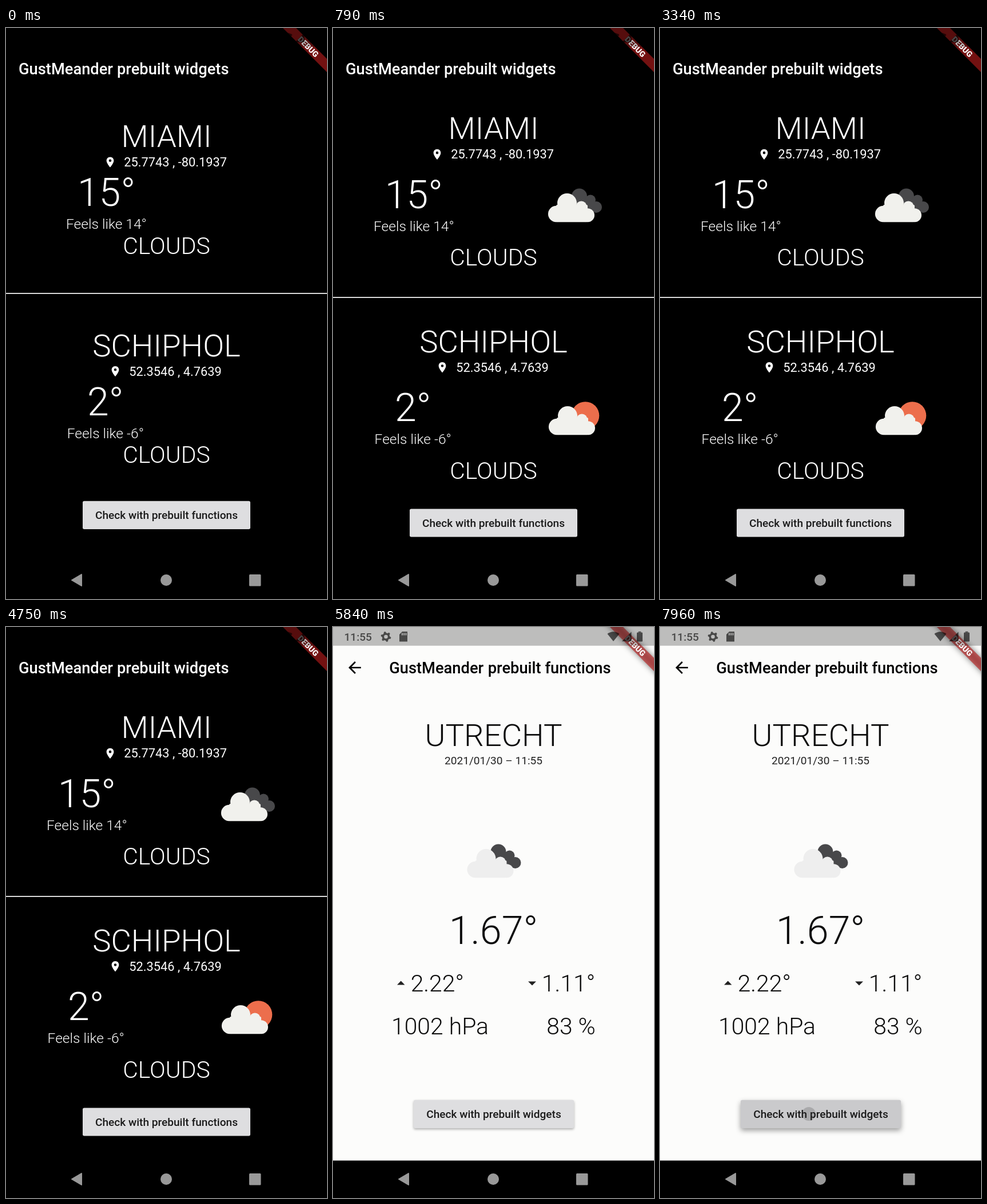
Animation, 561 px wide and 998 px high, one loop 8 s. Source, as an HTML page with a canvas:

```html
<!DOCTYPE html>
<html lang="en">
<head>
<meta charset="utf-8">
<title>Weather app</title>
<style>
html, body { margin: 0; width: 100%; height: 100%; overflow: hidden; background: #000; }
canvas { display: block; width: 561px; height: 998px; }
</style>
</head>
<body>
<canvas id="stage" width="561" height="998"></canvas>
<script>
const W = 561, H = 998, MID = W / 2, DP = W / 411.4, LOOP = 8000;
const T = { icons: 200, page: 4840, spin: 4560, data: 5500, press: 7720 };
const ctx = document.getElementById('stage').getContext('2d');
const BRAND = 'GustMeander';

const PIN = new Path2D('M12 2C8.13 2 5 5.13 5 9c0 5.25 7 13 7 13s7-7.75 7-13c0-3.87-3.13-7-7-7zm0 9.5a2.5 2.5 0 1 1 0-5 2.5 2.5 0 0 1 0 5z');
const BACK = new Path2D('M20 11H7.83l5.59-5.59L12 4l-8 8 8 8 1.41-1.41L7.83 13H20z');

const clamp = v => Math.min(1, Math.max(0, v));

// cubic-bezier(.4, 0, .2, 1), solved by bisection
function ease(x) {
  x = clamp(x);
  let lo = 0, hi = 1;
  for (let i = 0; i < 24; i++) {
    const u = (lo + hi) / 2, v = 1 - u;
    if (1.2 * v * v * u + 0.6 * v * u * u + u * u * u < x) lo = u; else hi = u;
  }
  return 3 * (1 - lo) * lo * lo + lo ** 3;
}

const setFont = (dp, weight) => ctx.font = `${weight} ${dp * DP}px Roboto, sans-serif`;
const widthOf = str => ctx.measureText(str).width;

// Words are placed one by one, so there is no kerning across spaces
function text(str, x, y, dp, weight, color, align = 'center') {
  setFont(dp, weight);
  ctx.fillStyle = color;
  const words = str.split(' '), space = widthOf(' ');
  const total = words.reduce((sum, w) => sum + widthOf(w) + space, -space);
  x -= total * { left: 0, center: 0.5, right: 1 }[align];
  for (const w of words) {
    ctx.fillText(w, x, y);
    x += widthOf(w) + space;
  }
}

function rect(x, y, w, h, color) {
  ctx.fillStyle = color;
  ctx.fillRect(x, y, w, h);
}

function round(x, y, w, h, r, color) {
  ctx.fillStyle = color;
  ctx.beginPath();
  ctx.roundRect(x, y, w, h, r);
  ctx.fill();
}

function poly(color, ...p) {
  ctx.fillStyle = color;
  ctx.beginPath();
  for (let i = 0; i < p.length; i += 2) ctx.lineTo(p[i], p[i + 1]);
  ctx.closePath();
  ctx.fill();
}

function dot(x, y, r, color) {
  ctx.fillStyle = color;
  ctx.beginPath();
  ctx.arc(x, y, r, 0, 2 * Math.PI);
  ctx.fill();
}

// 24-unit icon centred on a point
function icon(path, x, y, dp, color) {
  const s = dp * DP / 24;
  ctx.save();
  ctx.translate(x, y);
  ctx.scale(s, s);
  ctx.translate(-12, -12);
  ctx.fillStyle = color;
  ctx.fill(path, 'evenodd');
  ctx.restore();
}

function cloud(x, y, behind, color) {
  const dark = '#48484a';
  ctx.save();
  ctx.translate(x, y);
  if (behind === 'sun') {
    dot(64, 16.5, 24.3, '#ec6e4c');
  } else {
    dot(54.5, 5, 13.5, dark);
    dot(74, 11.5, 9, dark);
    dot(84, 24, 10, dark);
    rect(58, 10, 24, 22, dark);
  }
  dot(14.2, 36, 14.3, color);
  dot(33, 17, 17, color);
  dot(58, 23, 9.5, color);
  dot(69, 38.3, 12, color);
  round(14, 20, 55, 30.3, 2, color);
  ctx.restore();
}

function title(tail, left, right, color) {
  text(BRAND, left, 81, 20, 500, color, 'left');
  text(tail, right, 81, 20, 500, color, 'right');
}

function button(label, x, y, w, lift = 0) {
  const h = 36 * DP;
  ctx.save();
  ctx.shadowColor = `rgba(0,0,0,${0.32 + 0.06 * lift})`;
  ctx.shadowBlur = 4 + 6 * lift;
  ctx.shadowOffsetY = 2 + 2 * lift;
  const g = Math.round(222 - 20 * lift);
  round(x, y, w, h, 2 * DP, `rgb(${g},${g},${g + 2})`);
  ctx.restore();
  if (lift) dot(260, 851, 12 * lift, `rgba(0,0,0,${0.16 * lift})`);
  text(label, x + w / 2, y + 31.3, 14, 500, '#1a1a1a');
}

const CITIES = [
  { name: 'MIAMI', pos: '25.7743 , -80.1937', temp: '15°', feels: 'Feels like 14°',
    y: 208, pin: 182, cx: 376, cy: 289, behind: 'cloud' },
  { name: 'SCHIPHOL', pos: '52.3546 , 4.7639', temp: '2°', feels: 'Feels like -6°',
    y: 573.5, pin: 191, cx: 377, cy: 661, behind: 'sun' }
];

// The picture takes 100dp of the row and makes it 25dp taller
function city(c, index, loaded) {
  const white = '#fff';
  const y = c.y + (loaded ? (5 * index - 10) * DP : 0);
  const grow = loaded ? 25 * DP : 0, picture = loaded ? 100 * DP : 0;
  setFont(18, 300);
  const w = widthOf(c.feels), left = (W - picture - w) / 4 + w / 2;
  text(c.name, MID, y, 40, 300, white);
  icon(PIN, c.pin, y + 26.5, 16, white);
  text(c.pos, c.pin + 24.3, y + 34.1, 16, 400, white, 'left');
  text(c.temp, left, y + 103.1 + grow / 2, 50, 300, white);
  text(c.feels, left, y + 143.2 + grow / 2, 18, 300, white);
  text('CLOUDS', MID, y + 186.9 + grow, 30, 300, white);
  if (loaded) cloud(c.cx, c.cy, c.behind, '#f1f1ed');
}

function widgetsPage(t) {
  const loaded = t >= T.icons;
  rect(0, 0, W, H, '#000');
  title('prebuilt widgets', 22, 389.5, '#fff');
  CITIES.forEach((c, i) => city(c, i, loaded));
  rect(0, loaded ? 470 : 463, W, 1.7, '#fff');
  button('Check with prebuilt functions', 134, loaded ? 840.4 : 826.8, 293);
}

function spinner(ms) {
  const p = ms / 1333 % 1, arc = 1.5 * Math.PI;
  const head = ease(p * 2), tail = ease(p * 2 - 1);
  const start = -Math.PI / 2 + tail * arc + ms / 2222 * 2 * Math.PI + p * Math.PI / 2;
  ctx.strokeStyle = '#2196f3';
  ctx.lineWidth = 4 * DP;
  ctx.lineCap = 'square';
  ctx.beginPath();
  ctx.arc(MID, 520.8, 18 * DP, start, start + Math.max((head - tail) * arc, 0.001));
  ctx.stroke();
}

function functionsPage(t) {
  const ink = '#0c0c0c';
  rect(0, 0, W, H, '#fcfcfb');
  icon(BACK, 38, 71, 24, '#000');
  title('prebuilt functions', 98.2, 485.5, '#000');
  if (t < T.data) return spinner(t - T.spin);
  text('UTRECHT', MID, 208.4, 40, 300, ink);
  text('2021/01/30 – 11:55', MID, 239.6, 14, 400, '#222');
  cloud(234.5, 388, 'cloud', '#eeeeee');
  text('1.67°', MID, 554, 50, 300, ink);
  poly('#222', 112, 625.5, 118.7, 618.5, 125.5, 625.5);
  poly('#222', 341, 619.5, 355, 619.5, 348, 626.5);
  text('2.22°', 182.3, 636.7, 30, 300, ink);
  text('1.11°', 411.5, 636.7, 30, 300, ink);
  text('1002 hPa', 187, 712.3, 30, 300, ink);
  text('83 %', 416, 712.3, 30, 300, ink);
  button('Check with prebuilt widgets', 141, 826.8, 280, clamp((t - T.press) / 220));
}

function ribbon() {
  ctx.save();
  ctx.translate(W, 0);
  ctx.rotate(Math.PI / 4);
  const x = -60 * DP, y = 28 * DP, w = 120 * DP, h = 12 * DP;
  ctx.save();
  ctx.filter = 'blur(5.4px)';
  rect(x, y, w, h, 'rgba(0,0,0,.5)');
  ctx.restore();
  rect(x, y, w, h, 'rgba(183,28,28,.627)');
  text('DEBUG', 0, y + h / 2 + 4.9, 10.2, 900, '#fff');
  ctx.restore();
}

function statusBar() {
  const ink = 'rgba(0,0,0,.62)';
  rect(0, 0, W, 24 * DP, 'rgba(0,0,0,.25)');
  text('11:55', 19.5, 24, 14, 500, ink, 'left');
  // gear
  ctx.fillStyle = ink;
  ctx.beginPath();
  for (let i = 0; i < 24; i++) {
    const a = (i + 0.5) * Math.PI / 12, r = i % 4 < 2 ? 9 : 6.6;
    ctx.lineTo(92.5 + r * Math.cos(a), 17 + r * Math.sin(a));
  }
  ctx.closePath();
  ctx.moveTo(95.8, 17);
  ctx.arc(92.5, 17, 3.3, 0, 2 * Math.PI);
  ctx.fill('evenodd');
  // memory card
  ctx.beginPath();
  ctx.moveTo(121, 8);
  ctx.lineTo(130, 8);
  ctx.lineTo(130, 25.5);
  ctx.lineTo(116, 25.5);
  ctx.lineTo(116, 13);
  ctx.closePath();
  for (let i = 0; i < 3; i++) ctx.rect(120 + i * 3.3, 10.5, 1.8, 4);
  ctx.fill('evenodd');
  // wifi
  ctx.beginPath();
  ctx.moveTo(490, 25);
  ctx.lineTo(479.5, 12);
  ctx.quadraticCurveTo(490, 4.5, 500.5, 12);
  ctx.closePath();
  ctx.fill();
  poly(ink, 505, 25, 521.5, 8.5, 521.5, 25);
  round(531, 9.5, 10, 16, 1.2, ink);
  rect(533.7, 7.8, 4.6, 1.7, ink);
}

function navBar() {
  const grey = '#999', top = H - 48 * DP;
  rect(0, top, W, H - top, '#000');
  ctx.strokeStyle = grey;
  ctx.lineWidth = 2;
  ctx.lineJoin = 'round';
  ctx.lineCap = 'butt';
  poly(grey, 115, 965, 132, 955, 132, 975);
  ctx.stroke();
  dot(280, 965, 10, grey);
  round(425, 955, 20.5, 20.5, 1.5, grey);
}

function draw() {
  const t = performance.now() % LOOP;
  ctx.clearRect(0, 0, W, H);
  if (t < T.page) widgetsPage(t); else functionsPage(t);
  ribbon();
  statusBar();
  navBar();
  requestAnimationFrame(draw);
}
draw();
</script>
</body>
</html>
```
